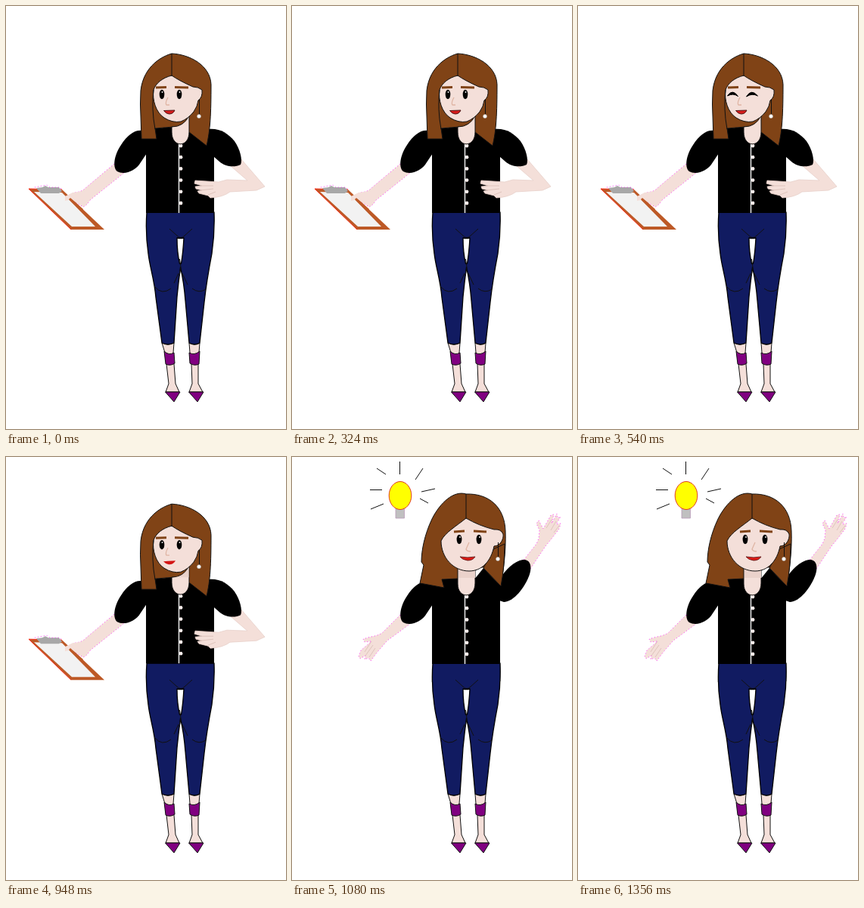
Animation of 370x560 px, one loop 1.54 s. Source, as an HTML page:

```html
<!DOCTYPE html>
<html lang="en">
<head>
<meta charset="utf-8">
<title>Woman with a bright idea</title>
<style>
  html, body { margin: 0; width: 100%; height: 100%; overflow: hidden; background: #fff; }
  svg { display: block; width: 370px; height: 560px; }
  path, ellipse, circle { stroke-linejoin: round; }
  .skin { fill: #f4dfd9; }
  .hair { fill: #804316; stroke: #111; }
  .denim { fill: #111b61; stroke: #000; stroke-width: 1.3; }
  .purple { fill: #800080; stroke: #111; }
  .line { fill: none; stroke: #111; }
  .outlined { stroke: #111; }
  .brow { fill: none; stroke: #804316; stroke-width: 3; }
  .nose { fill: none; stroke: #dfb5a4; stroke-width: 1.3; }
  .shade { fill: #ead2cb; }
  .fringe { stroke: #f0f; stroke-width: .8; stroke-dasharray: 1 3; }
  .crease { fill: none; stroke: #d9bdb4; stroke-width: .8; }
</style>
</head>
<body>
<svg viewBox="0 0 370 560">
  <g id="legs">
    <path class="skin outlined" d="M206 446Q214 450 222 446L221 459L222 474L224 500L229 511H211L215 500L212 474L210 459Z"/>
    <path class="skin outlined" d="M242 446Q249 450 256 446L255 459L254 474L254 500L260 511H242L246 500L245 474L243 459Z"/>
    <path class="purple" d="M209 457Q215 463 222 459L223 473Q217 477 211 474ZM210.500 511H230L222 524Z"/>
    <path class="purple" d="M242 459Q249 463 256 457L255 474Q249 477 243 473ZM241.500 511H261L253 524Z"/>
    <path class="denim" fill-rule="evenodd" d="M186 273H275Q276 301 272 328C267 354 264 374 262 392L256 446Q249 450 242 446L237 390Q235 365 230.500 346Q228 365 226 385L222 446Q214 450 206 446L198 386C196 362 190 346 188 328Q184 301 186 273ZM226 307Q226 326 229.500 341H231.500Q234 326 235 307Q230 308 226 307Z"/>
    <path class="line" d="M216 295L226 304Q231 309 236 304L246 295M197 372Q206 383 218 374M246 374Q255 381 264 375M228 354L222 367M233 354L240 369M229.500 335L231 346L229 357"/>
  </g>

  <g id="upper">
    <g data-pose="present">
      <path class="skin fringe" d="M143 209L106 240Q101 246 90 247L78 253L77 258L92 260L102 266Q107 264 111 257L156 221Z"/>
    </g>
    <g data-pose="idea">
      <path class="skin fringe" d="M143 209L119 233Q112 237 104 238L94 241L96 245L105 244L91 256L88 264L90 267L97 263L96 268L101 266L104 270L113 258L126 243L156 221Z"/>
      <path class="skin fringe" d="M304 139L323 115L326 108L327 97L323 88L326 84L332 95L342 77L346 76L343 88L350 75L351 81L355 79L349 89L355 88L353 95L344 107L335 118L315 148Z"/>
      <path class="crease" d="M336 94L343 83M342 97L349 85M346 100L353 91M105 244L96 258M107 249L97 263M110 253L102 265"/>
    </g>

    <path d="M185 167L197 162L220 160H242L265 163L275 170V274H185Z"/>
    <path d="M228.500 181V274" stroke="#fff" stroke-width="1.300"/>
    <g id="buttons" fill="#fff2ef"></g>

    <g data-pose="present">
      <path class="skin" stroke="#e8d0c9" stroke-width=".8" d="M311 203L342 239L331 244L296 246Q287 253 270 254L267 251L255 248L253 245L259 244L251 242L250 239L259 238L249 235L250 231L281 233L292 230L319 231L297 212Z"/>
      <path class="crease" d="M258 238L274 238M257 244L274 242M267 250L277 246"/>
    </g>

    <path d="M186 168C176 160 162 168 152 184C142 199 141 214 147 219C156 224 171 219 178 207L186 195Z"/>
    <path data-pose="present" d="M266 163C282 161 293 168 302 179C309 189 313 204 310 210C302 214 290 213 282 206L274 199Z"/>
    <path data-pose="idea" d="M274 163C282 148 294 138 305 136C315 135 318 145 313 158C305 178 290 192 280 192L274 190Z"/>

    <g data-pose="present">
      <path class="hair" d="M219 63C208 66 182 78 178 112L177.500 130L179 176H199L197 162L221 160L242 167L265 185C270 165 271 142 271 104C270 78 242 64 219 63Z"/>
      <path class="skin outlined" d="M219 160Q235 160 242 145V167C242 188 219 188 219 167Z"/>
      <path data-pose="closed" class="shade" d="M220 160Q235 160 241.500 146V160Z"/>
      <path class="skin outlined" d="M219 92C207 95 198 102 195 111C193 124 198 141 209 148Q220 155 231 153Q241 149 248 140Q253 133 254 125Q260 121 259 111Q254 107 247 107Q229 99 219 92Z"/>
      <path class="line" d="M219 63V93M195 111Q192 136 197 163M255.500 124V143"/>
      <circle cx="255" cy="146" r="2.500" fill="#fff" stroke="#aaa" stroke-width=".5"/>
      <path class="brow" d="M198 108L212 107.500M223 107.500L241 108"/>
      <path class="nose" d="M214 121Q210 128 212 131L216 131"/>
      <g data-pose="open">
        <ellipse cx="206" cy="117" rx="3.300" ry="6.200"/>
        <ellipse cx="229" cy="117" rx="3.300" ry="6.200"/>
        <circle cx="206.500" cy="114" r=".9" fill="#fff"/>
        <circle cx="229.500" cy="114" r=".9" fill="#fff"/>
      </g>
      <path data-pose="blink" d="M197.500 119Q204 109 211.500 119.500Q205 115 197.500 119ZM222.500 120Q229 109 237.500 119Q230 115 222.500 120Z" stroke="#000"/>
      <path data-pose="smile" d="M208.500 138.500L223 138Q221 143 215.500 143Q211 142.500 208.500 138.500Z" fill="#d51c1c" stroke="#401010" stroke-width=".9"/>
      <path data-pose="closed" d="M208 139L214 138.500L224 138Q221 143.500 215 143Q211 142.500 208 139Z" fill="#d31515"/>
    </g>

    <g data-pose="idea">
      <path class="hair" d="M230 49C214 44 196 60 185 82C175 103 171 124 171 139L174 143L169 167L201 173L198 162L220 161V145L253 146L276 171C279 151 283 126 282 98C281 66 260 48 230 49Z"/>
      <path d="M241 162L253 147L276 171V176H241Z"/>
      <path class="skin outlined" d="M219 145V168C219 188 242 188 242 167V145Z"/>
      <path class="shade" d="M220 149H242V160H220Z"/>
      <path class="hair" d="M253 147L276 171Q281 145 281 115L266 122Z"/>
      <path class="skin outlined" d="M230 81C218 91 202 100 197 111C197 133 213 151 234 151C251 151 263 138 267 118C275 118 280 109 279 102Q276 95 267 96Q247 91 230 81Z"/>
      <path class="line" d="M230 49V82M272.500 113V132"/>
      <circle cx="272" cy="135" r="2.500" fill="#fff" stroke="#aaa" stroke-width=".5"/>
      <path class="brow" d="M214 99L228 98M240 98L257 99"/>
      <path class="nose" d="M234 113L230 122Q231 125 236 125"/>
      <ellipse cx="221" cy="109" rx="3.400" ry="6.200"/>
      <ellipse cx="247" cy="109" rx="3.400" ry="6.200"/>
      <circle cx="222" cy="106" r=".9" fill="#fff"/>
      <circle cx="248" cy="106" r=".9" fill="#fff"/>
      <path d="M222 132Q232 134 242 132Q239 137 232 137Q225 136 222 132Z" fill="#df1c16" stroke="#541010" stroke-width=".8"/>
    </g>

    <g data-pose="present">
      <path d="M30 242L74 243L130 296H86Z" fill="#bd5926"/>
      <path d="M74 243L30 242L86 296" fill="none" stroke="#f32915"/>
      <path d="M37 246L74 247L118 292H87Z" fill="#f2f2f2"/>
      <path d="M40 241L48 240L52 238L56 240L70 240L74 245L70 248H46Z" fill="#a8a8a8"/>
      <path class="fringe" fill="none" d="M38 240L48 238L54 237L58 240H71L75 244"/>
      <path class="skin" d="M78 252L88 247L104 245L100 264L86 256L78 258Z"/>
      <path d="M84 255L101 270" stroke="#bd5926" stroke-width="3"/>
    </g>
  </g>

  <g data-pose="idea">
    <path d="M137 68H148.500V81H137Z" fill="#c0c0c0" stroke="#b99bb9" stroke-width=".8"/>
    <ellipse cx="143" cy="51" rx="14.800" ry="18.500" fill="#ff0" stroke="#e03a20"/>
    <path class="line" d="M142.500 6V23M112 15L124 23M173 15L163 30M103 43.500H119M189 42L171 46M104 69L121 62M180 61L169 55"/>
  </g>
</svg>
<script>
const LOOP = 1540;
const upper = document.getElementById("upper");
const parts = document.querySelectorAll("[data-pose]");
const scenes = [
  { end: 540, poses: ["present", "open", "smile"], lift: 0 },
  { end: 750, poses: ["present", "blink", "smile"], lift: 0 },
  { end: 1080, poses: ["present", "open", "closed"], lift: 0.8 },
  { end: LOOP, poses: ["idea"], lift: 0 }
];

document.getElementById("buttons").innerHTML = Array.from({ length: 6 }, (_, i) =>
  `<circle cx="231" cy="${185 + i * 15.2}" r="2.4"/>`).join("");

let current;
function draw(now) {
  const scene = scenes.find(({ end }) => now % LOOP < end);
  if (scene !== current) {
    current = scene;
    for (const part of parts) {
      part.style.display = scene.poses.includes(part.dataset.pose) ? "" : "none";
    }
    upper.setAttribute("transform", `translate(0 ${-scene.lift})`);
  }
}

function tick() {
  draw(performance.now());
  requestAnimationFrame(tick);
}
tick();
</script>
</body>
</html>
```
